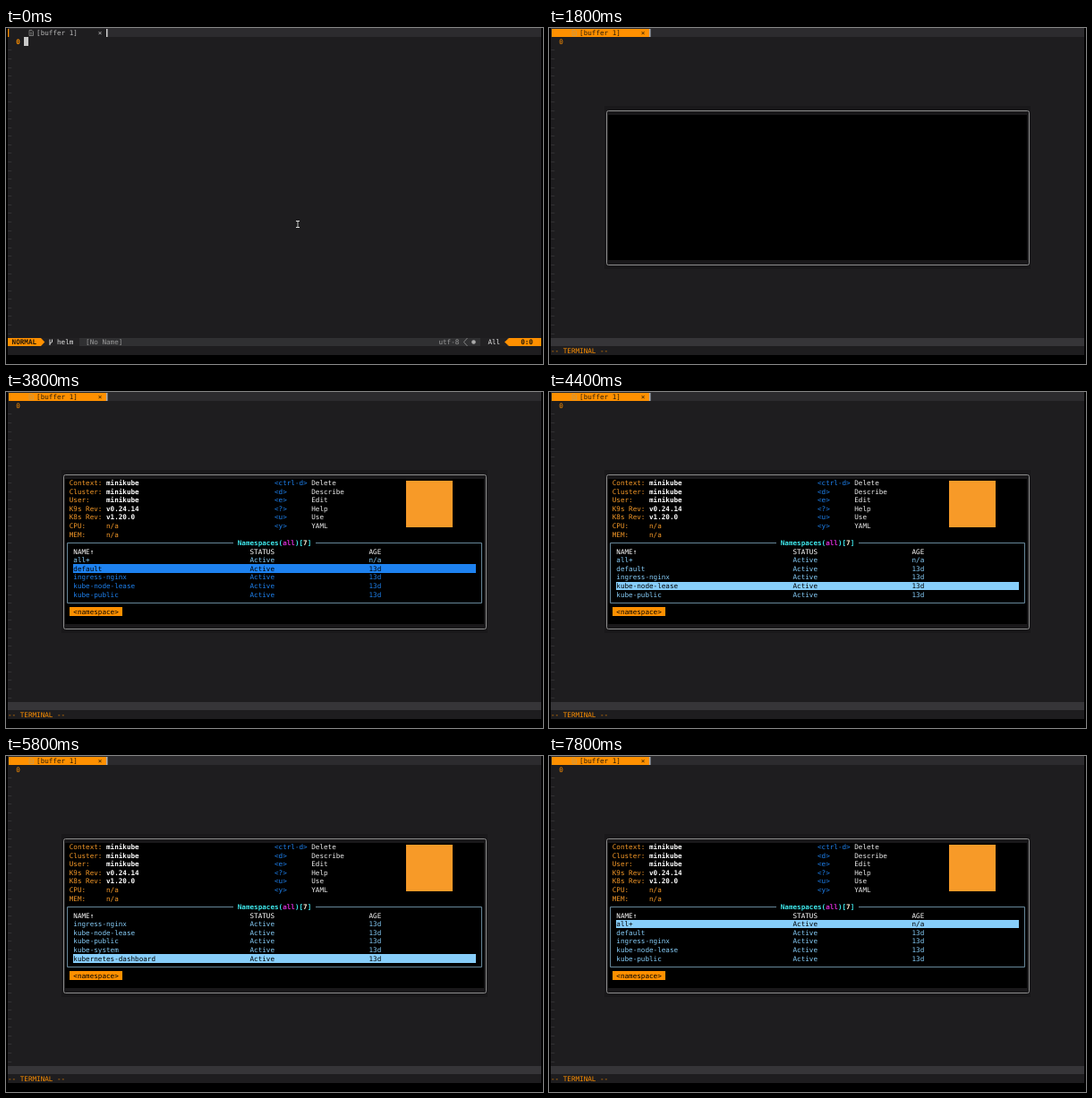
These frames come from a looping animation (600x375 px, 8 s). An HTML page with a canvas:

```html
<!DOCTYPE html>
<html lang="en">
<head>
<meta charset="utf-8">
<title>Editor with floating terminal</title>
<style>
  html, body { margin: 0; width: 100%; height: 100%; overflow: hidden; background: #000; }
  canvas { display: block; }
</style>
</head>
<body>
<canvas id="stage" width="600" height="375"></canvas>
<script>
const ctx = document.getElementById('stage').getContext('2d');

const LOOP = 8000, OPEN = 400, STARTED = 1800, READY = 2400, REFRESH = 4000;
const CELL_W = 4.585, CELL_H = 9.58, VISIBLE = 5;
const FONT = '7.62px "DejaVu Sans Mono", monospace';
const ORANGE = '#ff9000', BG = '#1e1d1f', BAR = '#2c2b2e', SKY = '#87cefa', BLUE = '#1e82f0';

const NAMESPACES = ['all+', 'default', 'ingress-nginx', 'kube-node-lease',
  'kube-public', 'kube-system', 'kubernetes-dashboard'];
const INFO = [['Context:', 'minikube'], ['Cluster:', 'minikube'], ['User:', 'minikube'],
  ['K9s Rev:', 'v0.24.14'], ['K8s Rev:', 'v1.20.0'], ['CPU:', 'n/a'], ['MEM:', 'n/a']];
const KEYS = [['<ctrl-d>', 'Delete'], ['<d>', 'Describe'], ['<e>', 'Edit'],
  ['<?>', 'Help'], ['<u>', 'Use'], ['<y>', 'YAML']];
// [time, selected row]
const MOVES = [[2400, 0], [3600, 1], [4000, 2], [4400, 3], [4600, 4], [5000, 5], [5400, 6],
  [6400, 5], [6800, 4], [7000, 3], [7200, 2], [7400, 1], [7600, 0]];

const colX = col => 2 + col * CELL_W;
const midY = row => 5.6 + row * CELL_H;

function rect(x, y, w, h, color) {
  ctx.fillStyle = color;
  ctx.fillRect(x, y, w, h);
}

// Fills a block of character cells, snapped to whole pixels.
function cells(col, row, cols, rows, color) {
  const x = Math.round(colX(col)), y = Math.round(midY(row - 0.5));
  rect(x, y, Math.round(colX(col + cols)) - x, Math.round(midY(row + rows - 0.5)) - y, color);
}

function put(col, row, text, color, bold) {
  ctx.font = (bold ? 'bold ' : '') + FONT;
  ctx.fillStyle = color;
  ctx.fillText(text, colX(col), midY(row) + 2.7);
}

function line(points, color, width = 1) {
  ctx.strokeStyle = color;
  ctx.lineWidth = width;
  ctx.beginPath();
  points.forEach(([x, y]) => ctx.lineTo(x, y));
  ctx.stroke();
}

function polygon(points, color) {
  ctx.fillStyle = color;
  ctx.beginPath();
  points.forEach(([x, y]) => ctx.lineTo(x, y));
  ctx.fill();
}

function circle(x, y, r, color) {
  ctx.fillStyle = color;
  ctx.beginPath();
  ctx.arc(x, y, r, 0, 2 * Math.PI);
  ctx.fill();
}

function drawEditor(inTerminal) {
  rect(0, 0, 600, 375, '#000');
  rect(2, 0, 596, 365, BG);
  rect(2, 0, 596, 10, BAR);
  rect(2, 1, 111, 9, BG);
  rect(inTerminal ? 3 : 2, 1, inTerminal ? 110 : 1.3, 9, ORANGE);
  rect(112, 1, 1.5, 9, inTerminal ? '#b0b0b0' : '#d0d0d0');

  const ink = inTerminal ? '#2a1c08' : '#b8b8b8';
  const icon = inTerminal ? '#c99a4a' : '#8a8a8a';
  line([[26, 2.5], [29, 2.5], [30.5, 4], [30.5, 8.5], [26, 8.5], [26, 2.5]], icon, 0.8);
  line([[27, 5], [29.5, 5]], icon, 0.7);
  line([[27, 6.8], [29.5, 6.8]], icon, 0.7);
  put(7, 0, '[buffer 1]', ink);
  put(22, 0, '×', ink);

  put(2, 1, '0', ORANGE, !inTerminal);
  for (let row = 2; row < 36; row++) put(0, row, '~', '#414043');
}

function drawStatus() {
  const top = 346, bottom = 355, mid = 350.5;
  rect(2, top, 596, 9, '#303032');
  rect(38, top, 44, 9, '#222123');
  rect(530, top, 30, 9, '#222123');
  rect(2, top, 37, 9, ORANGE);
  polygon([[39, top], [43.3, mid], [39, bottom]], ORANGE);
  put(1, 36, 'NORMAL', '#1c1408', true);

  line([[49, 347.5], [49, 354]], '#ddd');
  line([[49, 352], [51.5, 350.5], [51.5, 347.5]], '#ddd');
  put(12, 36, 'helm', '#e4e4e4');
  put(19, 36, '[No Name]', '#9a9a9a');
  put(105, 36, 'utf-8', '#9a9a9a');
  line([[515.5, top], [511.5, mid], [515.5, bottom]], '#9a9a9a', 0.8);
  circle(522.5, mid, 2.3, '#aaa');
  put(117, 36, 'All', '#e4e4e4');

  polygon([[562, top], [557, mid], [562, bottom]], ORANGE);
  rect(562, top, 36, 9, ORANGE);
  put(125, 36, '0:0', '#1c1408', true);
}

function drawPointer() {
  const stem = [[326, 215.5], [326, 222.5]];
  line(stem, '#000', 2.4);
  line(stem, '#ddd');
  for (const y of [215.5, 222.5]) line([[324, y], [328, y]], '#ddd');
}

function drawFloat() {
  rect(2, 346, 596, 9, '#363538');
  put(0, 37, '-- TERMINAL --', ORANGE);
  cells(13, 9, 104, 19, '#19181a');
  ctx.strokeStyle = '#8c8c8c';
  ctx.lineWidth = 1;
  ctx.beginPath();
  ctx.roundRect(64.5, 92.5, 472, 172, 2);
  ctx.stroke();
}

function selectionAt(t) {
  let selected = 0, offset = 0;
  for (const [time, row] of MOVES) {
    if (time > t) break;
    selected = row;
    offset = Math.min(selected, Math.max(offset, selected - VISIBLE + 1));
  }
  return { selected, offset };
}

function drawHeader() {
  INFO.forEach(([label, value], i) => {
    put(15, 10 + i, label, '#f79a28');
    const missing = value === 'n/a';
    put(24, 10 + i, value, missing ? '#f79a28' : '#fff', !missing);
  });
  KEYS.forEach(([key, action], i) => {
    put(65, 10 + i, key, BLUE);
    put(74, 10 + i, action, '#eee');
  });
  rect(447, 99, 52, 52, '#f79a28');
}

function drawTable(t) {
  line([[254, 168.5], [68.5, 168.5], [68.5, 235.5], [531.5, 235.5], [531.5, 168.5], [346, 168.5]], '#66879a');
  put(56, 17, 'Namespaces(', '#3fe8ec', true);
  put(67, 17, 'all', '#d02cd0', true);
  put(70, 17, ')[', '#3fe8ec', true);
  put(72, 17, '7', '#ffefd5', true);
  put(73, 17, ']', '#3fe8ec', true);

  const columns = [16, 59, 88];
  ['NAME↑', 'STATUS', 'AGE'].forEach((text, i) => put(columns[i], 18, text, '#fff'));

  const { selected, offset } = selectionAt(t);
  for (let i = 0; i < VISIBLE; i++) {
    const index = offset + i, row = 19 + i;
    const color = index === 0 || t >= REFRESH ? SKY : BLUE;
    const active = index === selected;
    if (active) cells(16, row, 98, 1, color);
    [NAMESPACES[index], 'Active', index ? '13d' : 'n/a'].forEach((text, c) =>
      put(columns[c], row, text, active ? '#000' : color));
  }

  cells(15, 25, 13, 1, ORANGE);
  put(16, 25, '<namespace>', '#000');
}

function draw(t) {
  const inTerminal = t >= OPEN;
  ctx.textRendering = 'geometricPrecision';
  drawEditor(inTerminal);
  if (!inTerminal) {
    cells(4, 1, 1, 1, '#c8c8c8');
    drawStatus();
    drawPointer();
    return;
  }
  drawFloat();
  if (t < STARTED) {
    cells(14, 10, 1, 1, '#a3b8cc');
    return;
  }
  cells(14, 10, 102, 17, '#000');
  if (t >= READY) {
    drawHeader();
    drawTable(t);
  }
}

const start = performance.now();
function tick() {
  draw((performance.now() - start) % LOOP);
  requestAnimationFrame(tick);
}
tick();
</script>
</body>
</html>
```
